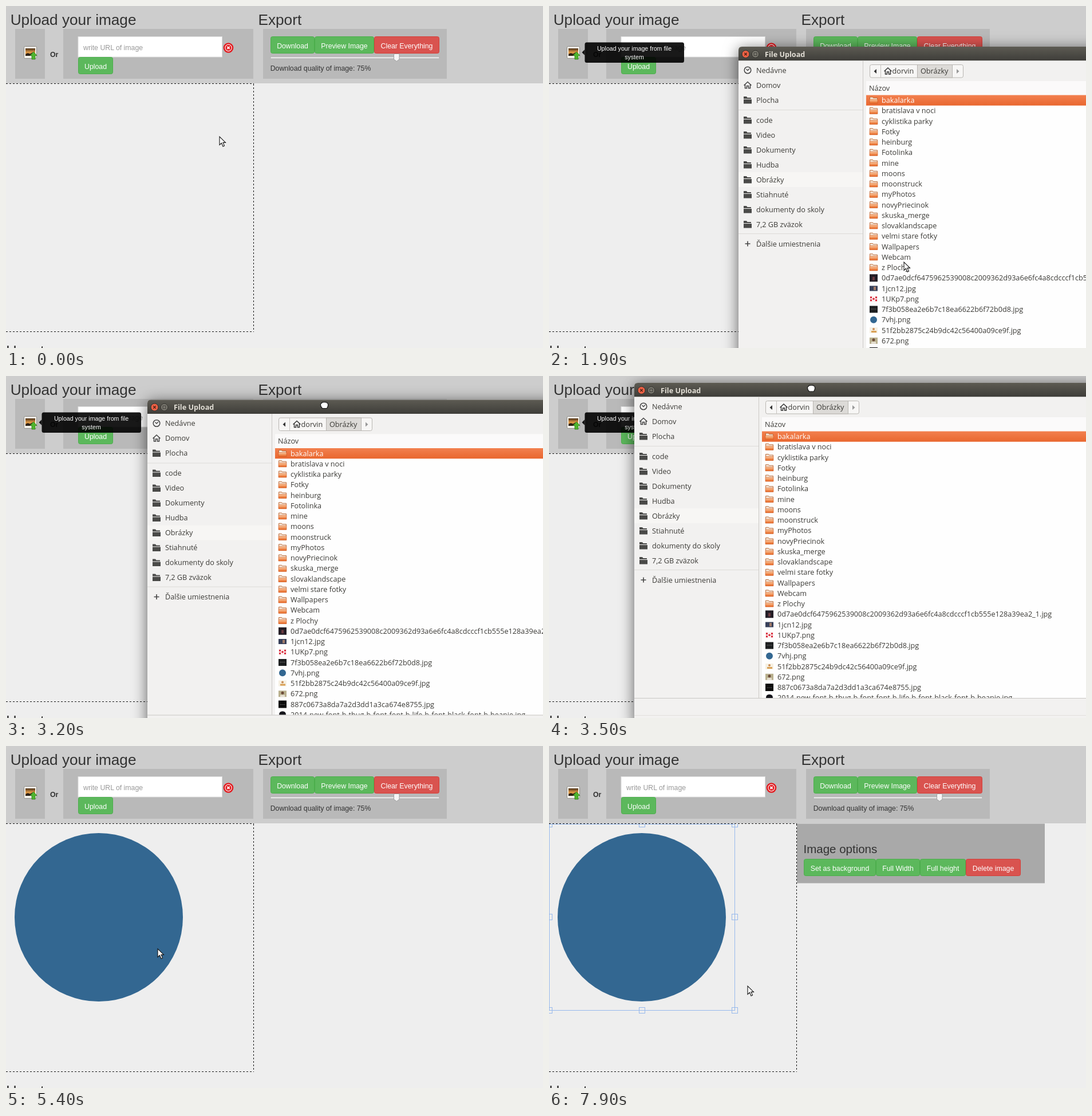
These frames come from a looping animation (938 px wide and 597 px high, 8000 ms). An HTML page:

```html
<!DOCTYPE html>
<html lang="en">
<head>
<meta charset="utf-8">
<title>Upload an image</title>
<style>
  html, body { margin: 0; width: 100%; height: 100%; overflow: hidden; background: #eee; }
  svg { display: block; width: 938px; height: 597px; }
  text { font-family: "Liberation Sans", Arial, sans-serif; fill: #333; white-space: pre; }
  .ui text { font-family: "Open Sans", "Noto Sans", sans-serif; fill: #3c3b37; }
  .ui .light { fill: #fff; }
  .shadow { filter: drop-shadow(0 4px 13px rgba(0, 0, 0, .6)); }
</style>
</head>
<body>
<svg id="stage" viewBox="0 0 938 597">
  <defs>
    <linearGradient id="bar" x2="0" y2="1"><stop stop-color="#5d5b53"/><stop offset="1" stop-color="#3e3d39"/></linearGradient>
    <linearGradient id="pick" x2="0" y2="1"><stop stop-color="#f2804f"/><stop offset="1" stop-color="#e9672f"/></linearGradient>
    <linearGradient id="fold" x2="0" y2="1"><stop stop-color="#f9c9a0"/><stop offset="1" stop-color="#e8641f"/></linearGradient>
    <linearGradient id="sunset" x2="0" y2="1"><stop stop-color="#4a3018"/><stop offset=".55" stop-color="#e8a04a"/><stop offset="1" stop-color="#2a1c12"/></linearGradient>
    <clipPath id="listClip"><rect x="223" y="60" width="700" height="490"/></clipPath>
    <clipPath id="nameClip"><rect x="223" y="84" width="415" height="466"/></clipPath>
    <clipPath id="staleClip"><rect x="331" y="95.5" width="607" height="502"/></clipPath>
    <clipPath id="canvasClip"><rect x="0" y="136" width="432" height="433"/></clipPath>
  </defs>
</svg>
<script>
const stage = document.getElementById('stage');

function add(parent, tag, attrs = {}, label) {
  const el = document.createElementNS('http://www.w3.org/2000/svg', tag);
  for (const k in attrs) el.setAttribute(k, attrs[k]);
  if (label) el.textContent = label;
  return parent.appendChild(el);
}
const group = (p, attrs) => add(p, 'g', attrs);
const rect = (p, x, y, width, height, fill, more) => add(p, 'rect', { x, y, width, height, fill, ...more });
const disc = (p, cx, cy, r, fill, more) => add(p, 'circle', { cx, cy, r, fill, ...more });
const path = (p, d, fill, more) => add(p, 'path', { d, fill, ...more });
const text = (p, x, y, label, size = 12.3, more) => add(p, 'text', { x, y, 'font-size': size, ...more }, label);
const line = (p, d, stroke, width = 1, more) => path(p, d, 'none', { stroke, 'stroke-width': width, ...more });

function button(p, x, y, w, label, red) {
  const box = rect(p, x + .5, y + .5, w - 1, 29, red ? '#d9534f' : '#5cb85c',
    { rx: 3, stroke: red ? '#d43f3a' : '#4cae4c' });
  text(p, x + w / 2, y + 21, label, 12.3, { 'text-anchor': 'middle', style: 'fill:#fff' });
  return box;
}

// Web page
const page = group(stage, { id: 'page' });
rect(page, 0, 0, 938, 597, '#eee');
rect(page, 0, 0, 938, 135, '#cdcdcd');
for (const [x, w] of [[16, 52], [100, 332], [449, 321]]) rect(page, x, 40, w, 87, '#b9b9b9');
text(page, 7.7, 33, 'Upload your image', 26.2);
text(page, 440.5, 33, 'Export', 26.2);
text(page, 0, 611, 'How to', 26.2);
text(page, 77, 89, 'Or', 12.3, { 'font-weight': 'bold' });

rect(page, 31.5, 70.5, 22, 21, '#f4f2ec', { rx: 2, stroke: '#8c8a84' });
rect(page, 34, 74, 17, 13, 'url(#sunset)');
path(page, 'M34 85l4-3 4 2 4-3 5 3v3h-17z', '#2b2016');
path(page, 'M48 80l6 6.5h-3v6.5h-6v-6.5h-3z', '#4fb52e', { stroke: '#2f7d1b', 'stroke-width': .8 });

rect(page, 126, 53.5, 251.5, 35.5, '#fff', { stroke: '#ddd' });
text(page, 135, 77, 'write URL of image', 12.3, { style: 'fill:#999' });
disc(page, 388.5, 73, 7.6, '#f3d4d4', { stroke: '#e3171c', 'stroke-width': 2.4 });
disc(page, 388.5, 73, 5, '#e3171c');
line(page, 'M386.3 70.8l4.4 4.4m0-4.4l-4.4 4.4', '#fff', 1.8);
button(page, 126, 89, 61, 'Upload');
button(page, 462, 53, 77, 'Download');
button(page, 539, 53, 104, 'Preview Image');
button(page, 643, 53, 114, 'Clear Everything', true);
rect(page, 462, 88.5, 295, 3.5, '#e4e4e4', { rx: 1.5, stroke: '#a5a5a5', 'stroke-width': .7 });
path(page, 'M677.5 85q0-1.5 1.5-1.5h6.5q1.5 0 1.5 1.5v8l-4.7 3.5l-4.8-3.5z', '#f6f6f6',
  { stroke: '#999', 'stroke-width': .9 });
text(page, 461.7, 113, 'Download quality of image: 75%');
line(page, 'M0 135.5H433M432.5 136V568M0 568.5H433', '#111', 1, { 'stroke-dasharray': 3 });

// Uploaded picture, its selection frame and options
const picture = group(stage);
disc(picture, 162, 299, 147, '#336791');

const options = group(stage);
const frame = group(options, { 'clip-path': 'url(#canvasClip)', fill: 'none', stroke: '#97b9ec' });
rect(frame, .5, 136.5, 324, 325, 'none');
for (const x of [.5, 162.5, 324.5]) for (const y of [136.5, 298.5, 461.5])
  if (x !== 162.5 || y !== 298.5) rect(frame, x - 5, y - 5, 10, 10, 'none');
rect(options, 433, 135.5, 433, 104, '#a9a9a9');
text(options, 444.5, 187, 'Image options', 20.5);
const setBack = button(options, 445, 197, 126, 'Set as background');
button(options, 571, 197, 77, 'Full Width');
button(options, 648, 197, 80, 'Full height');
button(options, 728, 197, 96, 'Delete image', true);

// Tooltip
const tip = group(stage);
path(tip, 'M57.5 81l5-5v10z', '#000', { opacity: .9 });
rect(tip, 62.5, 63.5, 173.5, 35.5, '#000', { rx: 3.5, opacity: .9 });
['Upload your image from file', 'system'].forEach((s, i) =>
  text(tip, 149, 78 + i * 15, s, 10.65, { 'text-anchor': 'middle', style: 'fill:#fff' }));

// File dialog
const SIZE = 12.65, W = 900;
const dialog = group(stage, { class: 'ui' });
path(dialog, `M0 600V6Q0 0 6 0H${W}V600z`, '#f2f1f0', { class: 'shadow' });
path(dialog, `M0 24.5V6Q0 0 6 0H${W}V24.5z`, 'url(#bar)');
disc(dialog, 12.5, 13, 6.5, '#ee6145', { stroke: '#33322e' });
line(dialog, 'M10.3 10.8l4.4 4.4m0-4.4l-4.4 4.4', '#4a2015', 1.3);
disc(dialog, 29.5, 13, 6.2, '#7b7970', { stroke: '#33322e' });
rect(dialog, 27, 10.5, 5, 5, 'none', { stroke: '#3c3b37' });
text(dialog, 46, 17.5, 'File Upload', SIZE, { 'font-weight': 'bold', style: 'fill:#e3dfd6' });

const body = group(dialog);
rect(body, 0, 24.5, W, 580, '#f2f1f0');
rect(body, 0, 219, 217, 26, '#f7f6f4');
line(body, 'M0 110.5H217M0 326.5H217', '#dddbd8');
line(body, 'M217.5 24.5V550', '#cbc9c6');

const HOME = 'M-6.5 .5L0-5.5L6.5 .5M-4.5-1V5.5H-1.5V1.5H1.5V5.5H4.5V-1';
const places = ['Nedávne', 'Domov', 'Plocha', 'code', 'Video', 'Dokumenty', 'Hudba', 'Obrázky',
  'Stiahnuté', 'dokumenty do skoly', '7,2 GB zväzok', 'Ďalšie umiestnenia'];
places.forEach((name, i) => {
  const y = 41 + i * 26 + (i > 2 ? 9 : 0) + (i > 10 ? 8 : 0);
  const icon = group(body, { transform: `translate(16 ${y})` });
  if (i === 0) {
    disc(icon, 0, 0, 5.8, 'none', { stroke: '#444', 'stroke-width': 1.5 });
    line(icon, 'M-2.5-2L0 .5L3-2.5', '#444', 1.3);
  } else if (i === 1) line(icon, HOME, '#444', 1.5);
  else if (i === 11) line(icon, 'M-4.5 0H4.5M0-4.5V4.5', '#444', 1.6);
  else path(icon, 'M-7-6h5l1.5 2h6.5v2h-13zM-7-1h14v7.5h-14z', '#4a4a48');
  text(body, 31, y + 4.5, name, SIZE);
});

// Path bar
rect(body, 229.5, 31.5, 163, 22.5, '#f7f6f5', { rx: 3, stroke: '#b9b6b2' });
rect(body, 312.5, 31.5, 61, 22.5, '#dcdad7', { stroke: '#b9b6b2' });
line(body, 'M248.5 31.5V54', '#c6c3bf');
path(body, 'M241 39v8l-4.5-4z', '#333');
path(body, 'M381 39v8l4.5-4z', '#999');
line(body, HOME, '#333', 1.4, { transform: 'translate(261 42.5)' });
text(body, 268.5, 47, 'dorvin', SIZE);
text(body, 318, 47, 'Obrázky', SIZE);

const folders = `bakalarka|14. máj
bratislava v noci|18. feb
cyklistika parky|2. apr
Fotky|24 nov 2016
heinburg|14. máj
Fotolinka|31. máj
mine|16 dec 2016
moons|2. apr
moonstruck|13. apr
myPhotos|8. mar
novyPriecinok|7. feb
skuska_merge|20. mar
slovaklandscape|2 nov 2016
velmi stare fotky|14. máj
Wallpapers|1 nov 2016
Webcam|6 okt 2016
z Plochy|14. máj`.split('\n').map(s => s.split('|'));
const files = `0d7ae0dcf6475962539008c2009362d93a6e6fc4a8cdcccf1cb555e128a39ea2_1.jpg|7 okt 2016|48,1
1jcn12.jpg|27. mar|31,7
1UKp7.png|25 feb 2016|162,7
7f3b058ea2e6b7c18ea6622b6f72b0d8.jpg|31 okt 2016|37,5
7vhj.png|27. mar|12,9
51f2bb2875c24b9dc42c56400a09ce9f.jpg|17. feb|11,5
672.png|15 nov 2016|300,8
887c0673a8da7a2d3dd1a3ca674e8755.jpg|4 okt 2016|25,5
2014-new-font-b-thug-b-font-font-b-life-b-font-black-font-b-beanie.jpg|26 júl 2015|16,2`
  .split('\n').map(s => s.split('|'));
const rows = [...folders, ...files];

// Thumbnails: painters for each file, centred on the origin
const thumbs = [
  g => { rect(g, -7, -6.5, 14, 13, '#241e26'); rect(g, -2, -2, 4, 6, '#6a3a40'); },
  g => { rect(g, -7, -4.5, 14, 9, '#38405a'); rect(g, 0, -3, 4, 6, '#a07a68'); },
  g => {
    rect(g, -7, -5, 14, 10, '#fbeeee');
    for (const x of [-6, 3]) for (const y of [-4, 1]) rect(g, x, y, 3, 3, '#d8283a');
    disc(g, 0, 0, 1.8, '#d8283a');
  },
  g => { rect(g, -7, -6, 14, 12, '#1d1f20'); rect(g, -5, -1, 10, 1, '#555'); },
  g => disc(g, 0, 0, 6, '#336791'),
  g => { rect(g, -7, -5, 14, 10, '#f6f0e2'); rect(g, -4, 1, 9, 3, '#d9a055'); disc(g, 0, -2, 2, '#c98d58'); },
  g => { rect(g, -7, -5.5, 14, 11, '#b9b08e'); disc(g, 0, -1.5, 2.5, '#6b4a38'); rect(g, -4, 2, 8, 3.5, '#e6e0d2'); },
  g => { rect(g, -7, -6.5, 14, 13, '#0c0c0c'); rect(g, -5, 0, 10, 1, '#444'); },
  g => path(g, 'M-6 7V0Q-6-6 0-6T6 0V7z', '#16161c'),
];

const shorten = s => s.startsWith('0d7') ? s.slice(0, 55) + '...' : s.startsWith('2014') ? s.slice(0, 63) + '...' : s;

function fileList(selected, columns) {
  const g = group(body, { 'clip-path': 'url(#listClip)' });
  rect(g, 223, 60, 700, 490, '#fefefe');
  rect(g, 223, 60, 700, 24, '#fbfafa');
  text(g, 228, 76.5, 'Názov', SIZE);
  if (columns) {
    line(g, 'M639.5 60V84M705.5 60V84', '#d5d3d0');
    path(g, 'M622.5 73h9l-4.5-4.5z', '#444');
    text(g, 645, 76.5, 'Veľkosť', SIZE);
    text(g, 711, 76.5, 'Zmenený', SIZE);
  }
  rect(g, 223, 84.5 + selected * 18.25, 700, 18.25, 'url(#pick)');
  const names = group(g, columns ? { 'clip-path': 'url(#nameClip)' } : {});
  rows.forEach(([name, date, size], i) => {
    const y = 93.5 + i * 18.25, style = i === selected ? { class: 'light' } : {};
    const icon = group(g, { transform: `translate(236 ${y})` });
    if (i < folders.length) {
      path(icon, 'M-6.5 5V-5.5h5l1 1.5h7V5z', '#f3e4d6', { stroke: '#b5602c', 'stroke-width': .9 });
      path(icon, 'M-7 5.5V-1.5H7V5.5z', 'url(#fold)', { stroke: '#cf5a22', 'stroke-width': .6 });
    } else thumbs[i - folders.length](icon);
    text(names, 250, y + 4.5, columns ? shorten(name) : name, SIZE, style);
    if (!columns) return;
    if (size) text(g, 646, y + 4.5, size + ' kB', SIZE, style);
    text(g, 712, y + 4.5, date, SIZE, style);
  });
  if (columns) rect(g, 786, 84, 4, 27, '#f08a5f', { rx: 1.5 });
  return g;
}
const wideList = fileList(0, false);
const pickedList = fileList(21, true);
line(body, `M0 550.5H${W}`, '#c9c7c4');
line(body, `M0 580.5H${W}`, '#e2e0dd');

// Page pixels left in the window before it paints
const stale = group(stage, { 'clip-path': 'url(#staleClip)' });
add(stale, 'use', { href: '#page', y: 24.5 });

// Pointers
const pointer = (d, width) => path(stage, d, '#fff', { stroke: '#151515', 'stroke-width': width });
const arrow = pointer('M0 0V14.5L3.5 11.3L6 17.2L8.5 16L6 10.4H10.5Z', 1.1);
const hand = pointer('M-1.5 1q1.5-2 3 0v5l5.5 1.2q2 .7 1.6 3l-1.4 5.5h-7.5l-4.5-6q0-2 2-1.5l1.3 1.3z', 1.2);
const fist = pointer('M-6.5 0q0-3 2-3q1-2.5 3-1.5q2-1 3 0q2-1 3 1q2 0 2 3v2q-1 3-2 4.5h-8q-3-3-3-6z', 1.2);

// Tables of [time, x, y]
const windowTrack = [[2900, 331, 71], [3000, 316, 65], [3200, 247, 41.5], [3500, 149, 12]];
const pointerTrack = [
  [0, 373, 228], [900, 47, 74], [1300, 47, 74], [1700, 508, 280], [1900, 620, 447], [2100, 630, 488],
  [2500, 585, 260], [2800, 640, 84], [2900, 640, 80], [3000, 625, 74], [3200, 556, 50.5], [3500, 458, 21],
  [3800, 456, 406], [4300, 443, 488], [5000, 444, 487], [5400, 265, 354], [5600, 122, 244],
  [5700, 200, 291], [5800, 200, 291], [5900, 189, 283], [6000, 189, 283], [6900, 493, 209],
  [7200, 466, 211], [7600, 466, 211], [7700, 440, 262], [7800, 380, 370], [7900, 347, 419],
];

function at(track, t) {
  const i = track.findIndex(k => k[0] >= t);
  if (i < 0) return track[track.length - 1].slice(1);
  if (i === 0) return track[0].slice(1);
  const [t0, x0, y0] = track[i - 1], [t1, x1, y1] = track[i];
  const f = (t - t0) / (t1 - t0);
  return [x0 + (x1 - x0) * f, y0 + (y1 - y0) * f];
}
const show = (el, on) => el.setAttribute('display', on ? 'inline' : 'none');
const move = (el, [x, y]) => el.setAttribute('transform', `translate(${x} ${y})`);

function draw(t) {
  const open = t >= 1200 && t < 5000;
  const [x, y] = at(pointerTrack, t);
  const hover = t >= 5900 && x > 445 && x < 571 && y > 197 && y < 227;
  const drag = t >= 3000 && t <= 3500;
  const point = hover || (t >= 800 && t <= 1300) || (t >= 4800 && t < 5000);

  show(tip, t >= 900 && t < 5100);
  tip.setAttribute('opacity', t < 1000 ? .5 : 1);
  show(dialog, open);
  move(dialog, at(windowTrack, t));
  show(body, t >= 1400);
  show(stale, open && t < 1400);
  show(wideList, t < 4500);
  show(pickedList, t >= 4500);
  show(picture, t >= 5200);
  show(options, t >= 5900);
  setBack.setAttribute('fill', hover ? '#449d44' : '#5cb85c');
  setBack.setAttribute('stroke', hover ? '#398439' : '#4cae4c');

  show(arrow, !drag && !point);
  show(hand, point);
  show(fist, drag);
  for (const el of [arrow, hand, fist]) move(el, [x, y]);
}

// The picture advances ten times a second
function tick() {
  draw(Math.floor(performance.now() % 8000 / 100) * 100);
  requestAnimationFrame(tick);
}
tick();
</script>
</body>
</html>
```
